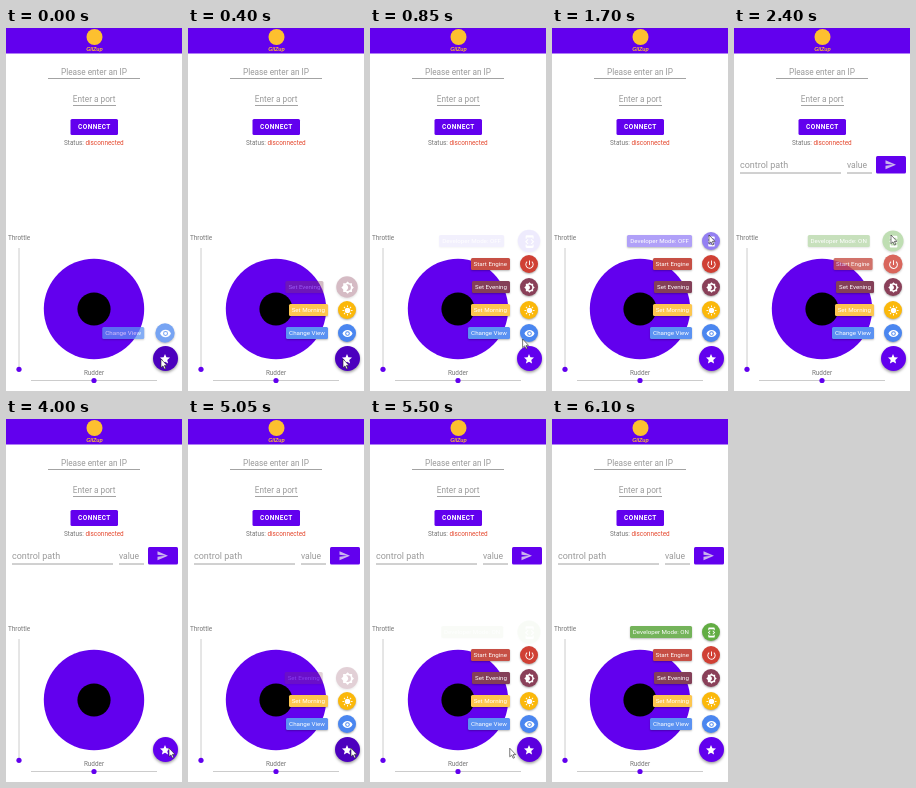
Recreate the animation shown at these times as an HTML page. Size 176 by 363 pixels, loop 7150 ms.

```html
<!DOCTYPE html>
<html lang="en">
<head>
<meta charset="utf-8">
<title>Remote control</title>
<style>
  html, body { margin: 0; width: 100%; height: 100%; overflow: hidden; background: #fff; }
  body { position: relative; font-family: Roboto, sans-serif; }
  svg { display: block; }
  #scene, #pointer { position: absolute; left: 0; top: 0; }
  .item { position: absolute; left: 0; width: 176px; height: 0; }
  .label {
    position: absolute; right: 36px; top: -6px; height: 12px; padding: 0 3px;
    border-radius: 1.5px; background: var(--tag); color: #fff;
    font-size: 6.2px; line-height: 12px; white-space: nowrap;
    box-shadow: 0 1px 2px #0004;
  }
  .disc {
    position: absolute; left: 150px; top: -9px; width: 18px; height: 18px;
    border-radius: 50%; background: var(--disc); box-shadow: 0 1px 2px #0005;
  }
  .disc svg { position: absolute; left: 3.5px; top: 3.5px; width: 11px; height: 11px; fill: #fff; }
  #fab {
    position: absolute; left: 146.5px; top: 318px; width: 25px; height: 25px;
    border-radius: 50%; box-shadow: 0 1.5px 3px #0006;
  }
  #fab svg { position: absolute; left: 6.5px; top: 6.5px; width: 12px; height: 12px; fill: #fff; }
</style>
</head>
<body>
<svg id="scene" width="176" height="363" viewBox="0 0 176 363" font-size="6.4" fill="#777">
  <rect width="176" height="25.5" fill="#6200ee"/>
  <circle cx="88.5" cy="9" r="8" fill="#fdc02f"/>
  <text x="88.5" y="23.2" text-anchor="middle" font-size="6" font-style="italic" font-weight="700" font-family="Lato, sans-serif" fill="#fdc02f">GliZup</text>

  <g font-size="8.25" text-anchor="middle" fill="#9a9a9a">
    <text x="88" y="47">Please enter an IP</text>
    <text x="88.2" y="74.3">Enter a port</text>
  </g>
  <path d="M42 50.5H134M67 77.5H110" stroke="#8c8c8c" stroke-width=".8"/>
  <rect x="64.5" y="91" width="47.5" height="16" rx="1.5" fill="#6200ee"/>
  <text x="88.4" y="101.4" text-anchor="middle" font-size="6.5" font-weight="700" letter-spacing=".4" fill="#fff">CONNECT</text>
  <text x="58" y="116.7">Status: <tspan fill="#e5492f">disconnected</tspan></text>

  <g id="command" font-size="9" fill="#9a9a9a">
    <text x="6" y="140">control path</text>
    <text x="113" y="140" font-size="8.6">value</text>
    <path d="M6 145H107M113 145H138" stroke="#8c8c8c" stroke-width=".8"/>
    <rect x="142" y="128" width="30" height="17.5" rx="1.5" fill="#6200ee"/>
    <path d="M2 21 23 12 2 3v7l15 2-15 2z" fill="#cbb3ee" transform="translate(150.5 130.8) scale(.5)"/>
  </g>

  <text x="2" y="212">Throttle</text>
  <text x="88" y="346.6" text-anchor="middle">Rudder</text>
  <path d="M13 220V342M25 352.5H151" stroke="#ccc"/>
  <g fill="#6200ee">
    <circle cx="13" cy="341.3" r="2.6"/>
    <circle cx="88" cy="352.5" r="2.6"/>
    <circle cx="88" cy="281" r="50.2"/>
  </g>
  <circle cx="88" cy="281" r="16.6" fill="#000"/>
</svg>

<div id="menu"></div>
<div id="fab"><svg viewBox="0 0 24 24"><path d="M12 17.27 18.18 21l-1.64-7.03L22 9.24l-7.19-.61L12 2 9.19 8.63 2 9.24l5.46 4.73L5.82 21z"/></svg></div>

<svg id="pointer" width="176" height="363">
  <path d="M0 0V8.6L2 6.9 3.4 10 4.8 9.4 3.4 6.4H6z" fill="#fff" stroke="#222" stroke-width=".6"/>
</svg>

<script>
const LOOP = 7150, TICK = 50;
const TOGGLE = 2200, REOPEN = 4400;
const $ = selector => document.querySelector(selector);
const clamp = v => Math.min(1, Math.max(0, v));
const ramp = (t, start, length) => clamp((t - start) / length);
const smooth = u => u * u * (3 - 2 * u);
const mix = (a, b, u) => a + (b - a) * u;

const icons = {
  eye: 'M12 4.5C7 4.5 2.73 7.61 1 12c1.73 4.39 6 7.5 11 7.5s9.27-3.11 11-7.5c-1.73-4.39-6-7.5-11-7.5zM12 17a5 5 0 1 1 0-10 5 5 0 0 1 0 10zm0-8a3 3 0 1 0 0 6 3 3 0 0 0 0-6z',
  moon: 'M20 8.69V4h-4.69L12 .69 8.69 4H4v4.69L.69 12 4 15.31V20h4.69L12 23.31 15.31 20H20v-4.69L23.31 12zM12 18c-.89 0-1.74-.2-2.5-.55C11.56 16.5 13 14.42 13 12s-1.44-4.5-3.5-5.45C10.26 6.2 11.11 6 12 6a6 6 0 0 1 0 12z',
  power: 'M13 3h-2v10h2zm4.83 2.17-1.42 1.42A6.92 6.92 0 0 1 19 12a7 7 0 1 1-11.42-5.4L6.17 5.17A9 9 0 1 0 21 12a8.94 8.94 0 0 0-3.17-6.83z',
  phone: 'M7 5h10v2h2V3c0-1.1-.9-2-2-2H7c-1.1 0-2 .9-2 2v4h2zm8.41 11.59L20 12l-4.59-4.59L14 8.83 17.17 12 14 15.17zM10 15.17 6.83 12 10 8.83 8.59 7.41 4 12l4.59 4.59zM17 19H7v-2H5v4c0 1.1.9 2 2 2h10c1.1 0 2-.9 2-2v-4h-2z'
};
const rays = Array.from({ length: 8 }, (_, i) =>
  `<path d="M11 1h2v3.5h-2z" transform="rotate(${i * 45} 12 12)"/>`).join('');
const glyph = name => name === 'sun'
  ? `<circle cx="12" cy="12" r="6"/>${rays}`
  : `<path d="${icons[name]}"/>`;

// Listed from the bottom of the menu upwards.
const items = [
  ['Change View', 'eye', '#5b92f2', '#4a86f0'],
  ['Set Morning', 'sun', '#fdc64f', '#fbb80a'],
  ['Set Evening', 'moon', '#843f58', '#8a4059'],
  ['Start Engine', 'power', '#c64f45', '#d04034'],
  ['Developer Mode: OFF', 'phone', '#b0a0f8', '#937ff2']
].map(([text, icon, tag, disc], i) => {
  const el = document.createElement('div');
  el.className = 'item';
  el.style.cssText = `top:${305 - 23 * i}px;--tag:${tag};--disc:${disc}`;
  el.innerHTML = `<div class="label">${text}</div>
    <div class="disc"><svg viewBox="0 0 24 24">${glyph(icon)}</svg></div>`;
  $('#menu').append(el);
  return { el, label: el.children[0], disc: el.children[1] };
});

function shown(i, t) {
  if (t < TOGGLE) return ramp(t, -187 + 250 * i, 250);
  if (t < REOPEN) return 1 - ramp(t, TOGGLE + 50 + 100 * (4 - i), 250);
  return ramp(t, REOPEN + 90 + 250 * i, 250);
}

function pointerAt(t) {
  if (t < TOGGLE) {
    const u = smooth(ramp(t, 560, 1140));
    return [mix(155, 157, u) - 20 * u * (1 - u), mix(331, 207, u)];
  }
  if (t < REOPEN) {
    const u = smooth(ramp(t, 3250, 750));
    return [mix(157, 163, u), mix(207, 329, u)];
  }
  const u = ramp(t, 5150, 950) ** 1.5;
  return [mix(163, 59, u), mix(329, 364, u ** 3.4)];
}

function pressed(t) {
  if (t < TOGGLE) return 1 - ramp(t, 600, 150);
  return ramp(t, REOPEN - 50, 150) - ramp(t, 5400, 150);
}

function draw(t) {
  items.forEach(({ el, label, disc }, i) => {
    const p = shown(i, t);
    el.style.opacity = p;
    label.style.transform = `translateX(${-7 * (1 - p)}px)`;
    disc.style.transform = `scale(${1.3 - 0.3 * p})`;
  });
  const on = t >= TOGGLE, dev = items[4];
  dev.label.textContent = 'Developer Mode: ' + (on ? 'ON' : 'OFF');
  dev.el.style.setProperty('--tag', on ? '#74b35a' : '#b0a0f8');
  dev.el.style.setProperty('--disc', on ? '#62ad43' : '#937ff2');
  $('#command').style.display = on ? '' : 'none';

  const k = pressed(t);
  $('#fab').style.background = `rgb(${mix(98, 76, k)} 0 ${mix(238, 190, k)})`;
  const [x, y] = pointerAt(t);
  $('#pointer path').setAttribute('transform', `translate(${x} ${y})`);
}

const begin = performance.now();
function tick() {
  const t = (performance.now() - begin) % LOOP;
  draw(Math.floor(t / TICK) * TICK);
  requestAnimationFrame(tick);
}
tick();
</script>
</body>
</html>
```
